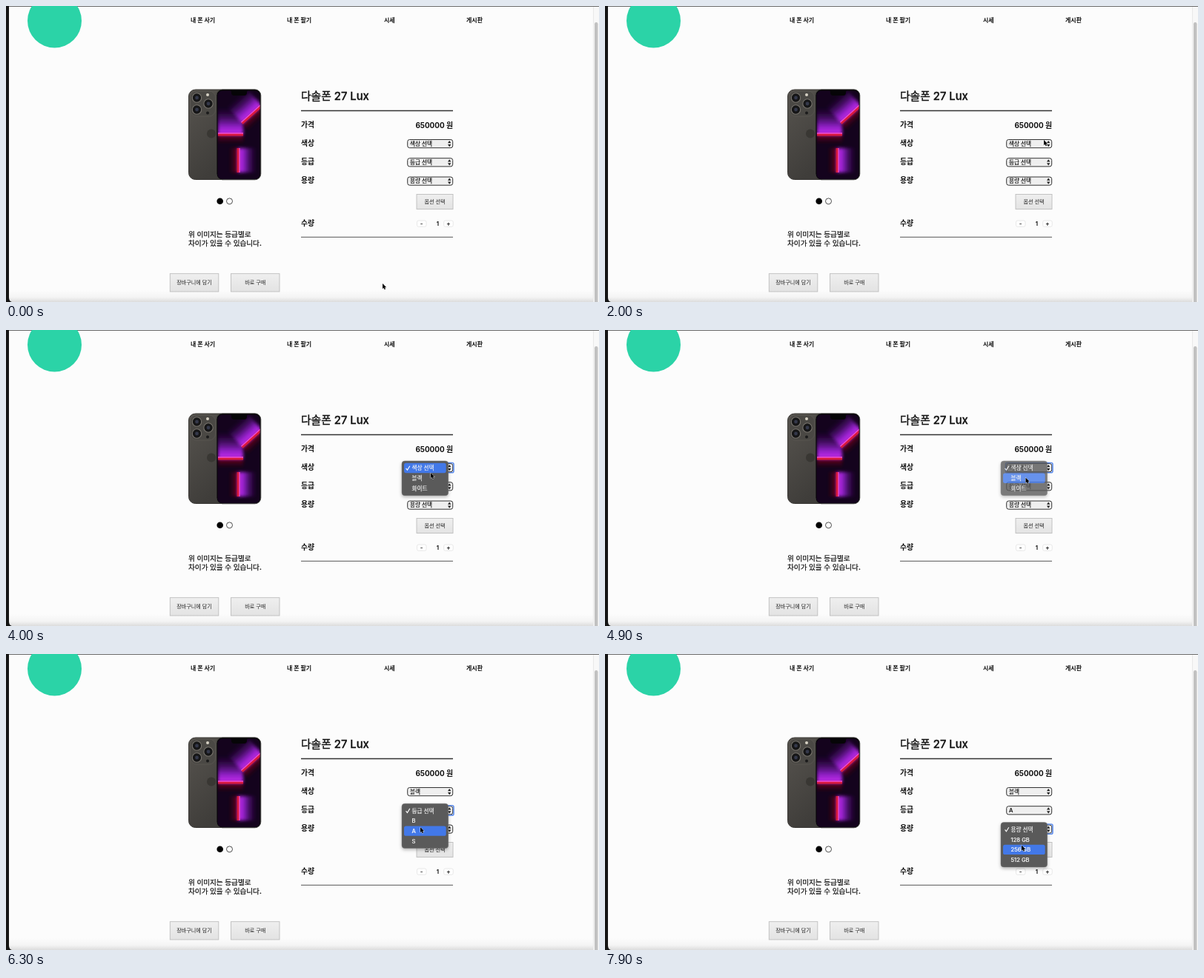
An HTML page that plays this animation: 800x400 px, repeating every 8 s.

```html
<!DOCTYPE html>
<html lang="ko">
<head>
<meta charset="utf-8">
<style>
  html, body { margin: 0; width: 100%; height: 100%; overflow: hidden; background: #fcfcfc; }
  svg { display: block; width: 800px; height: 400px; font-family: Inter, "Noto Sans CJK KR", "Noto Sans CJK", sans-serif; }
</style>
</head>
<body>
<svg id="stage" viewBox="0 0 800 400">
  <defs>
    <linearGradient id="floor" x2="0" y2="1"><stop stop-color="#fcfcfc"/><stop offset=".6" stop-color="#f4f4f4"/><stop offset="1" stop-color="#dcdcdc"/></linearGradient>
    <linearGradient id="button" x2="0" y2="1"><stop stop-color="#efefef"/><stop offset="1" stop-color="#e3e3e3"/></linearGradient>
    <linearGradient id="metal" x2=".4" y2="1"><stop stop-color="#57544f"/><stop offset="1" stop-color="#3f3d3a"/></linearGradient>
    <linearGradient id="violet" x2="0" y1="1" y2="0"><stop stop-color="#c42df0"/><stop offset=".3" stop-color="#8a1fc0"/><stop offset="1" stop-color="#3a0a5c" stop-opacity="0"/></linearGradient>
    <linearGradient id="ember" x2="0" y2="1"><stop stop-color="#8a0c24"/><stop offset="1" stop-color="#30040f" stop-opacity="0"/></linearGradient>
    <filter id="soft" x="-30%" y="-30%" width="160%" height="160%"><feGaussianBlur stdDeviation="2"/></filter>
    <filter id="shade" x="-20%" y="-20%" width="140%" height="150%"><feDropShadow dx="0" dy="2" stdDeviation="2" flood-opacity=".28"/></filter>
    <clipPath id="screen"><rect x="285.5" y="114.5" width="57" height="119.5" rx="6.5"/></clipPath>
  </defs>

  <!-- Browser window -->
  <rect width="800" height="400" fill="#fcfcfc"/>
  <rect y="384" width="800" height="16" fill="url(#floor)"/>
  <rect x="792" width="8" height="400" fill="#f8f8f8"/>
  <path d="M792.5 0V400" stroke="#e9e9e9"/>
  <rect x="794" y="22" width="4.5" height="380" rx="2.2" fill="#c1c1c1"/>
  <rect width="800" height="1" fill="#6a6a6a"/>
  <path d="M0 0H4V394Q4 399 8 400H0Z" fill="#151515"/>
  <circle cx="65.5" cy="20" r="36.5" fill="#2bd3a7"/>

  <!-- Phone -->
  <rect x="246.5" y="113" width="52" height="121.5" rx="9" fill="url(#metal)" stroke="#3a3835"/>
  <rect x="248.5" y="115" width="34" height="34" rx="8.5" fill="#4a4844" stroke="#5f5c57" stroke-width=".6"/>
  <g fill="#161617" stroke="#77736c" stroke-width="1.1">
    <circle cx="257.5" cy="124" r="6.2"/><circle cx="257.5" cy="140" r="6.2"/><circle cx="273" cy="132" r="6.2"/>
  </g>
  <g fill="#34384a"><circle cx="257.5" cy="124" r="2.4"/><circle cx="257.5" cy="140" r="2.4"/><circle cx="273" cy="132" r="2.4"/></g>
  <circle cx="272" cy="120" r="2" fill="#d6d1c4"/><circle cx="272" cy="144.5" r="2" fill="#1b1b1b"/>
  <circle cx="277" cy="172.5" r="6" fill="#393733"/>
  <rect x="284" y="112.8" width="59.8" height="122" rx="8" fill="#060507" stroke="#454341" stroke-width=".8"/>
  <rect x="285.5" y="114.5" width="57" height="119.5" rx="6.5" fill="#14031d"/>
  <g id="beams" clip-path="url(#screen)"></g>
  <path d="M303 114H326Q325 115 325 117Q325 121 321 121H308Q304 121 304 117Q304 115 303 114Z" fill="#060507"/>
  <circle cx="288.7" cy="263.8" r="4.3"/>
  <circle cx="301.5" cy="263.8" r="4" fill="#fff" stroke="#222" stroke-width=".8"/>

  <path d="M398 141.5H603" stroke="#333" stroke-width="1.4"/>
  <path d="M398 312.3H603" stroke="#555"/>
  <g id="page"></g>
  <g id="live"></g>
  <path id="cursor" d="M0 0V7.2L1.6 5.8 2.6 8.2 4 7.6 3 5.3H5.2Z" fill="#000" stroke="#fff" stroke-width=".8" paint-order="stroke"/>
</svg>
<script>
const page = document.getElementById("page");
const live = document.getElementById("live");
const cursor = document.getElementById("cursor");

// Medium weight gets a hairline outline, since the Korean face may lack it.
const text = (x, y, size, content, weight = 400, anchor = "start", fill = "#111") =>
  `<text x="${x}" y="${y}" font-size="${size}" font-weight="${weight}" text-anchor="${anchor}" fill="${fill}"` +
  (weight === 500 ? ` stroke="${fill}" stroke-width="${size * 0.022}"` : "") + `>${content}</text>`;
const button = (x, y, w, h, label) =>
  `<rect x="${x}" y="${y}" width="${w}" height="${h}" fill="url(#button)" stroke="#bdbdbd" stroke-width=".9"/>` +
  text(x + w / 2, y + h / 2 + 2.6, 7.1, label, 400, "middle", "#222");
const stepper = (x, sign) =>
  `<rect x="${x}" y="290" width="12.5" height="8.2" rx="2" fill="#fff" stroke="#dedede" stroke-width=".7"/>` +
  text(x + 6.2, 296.8, 8, sign, 500, "middle");

// A light bar: violet haze on one side, red on the other.
const beam = (x, y, angle, length, reach) =>
  `<g transform="translate(${x} ${y}) rotate(${angle})">
    <g filter="url(#soft)">
      <rect y="${-reach}" width="${length}" height="${reach}" fill="url(#violet)"/>
      <rect width="${length}" height="14" fill="url(#ember)"/>
    </g>
    <path d="M0 .8H${length}" stroke="#d81a3c" stroke-width="3.2"/>
    <path d="M0 -1H${length}" stroke="#f24fd0" stroke-width="1.3"/>
  </g>`;

document.getElementById("beams").innerHTML =
  beam(286, 173, 0, 34, 36) + beam(318, 158, -42, 36, 30) + beam(314, 192, 90, 33, 24);

page.innerHTML = [
  text(249, 22.3, 8, "내 폰 사기", 700), text(379, 22.3, 8, "내 폰 팔기", 700),
  text(510, 22.3, 8, "시세", 700), text(621, 22.3, 8, "게시판", 700),
  text(398, 127, 14.8, "다솔폰 27 Lux", 500),
  text(398, 164.3, 9.8, "가격", 700), text(603, 164.5, 9.9, "650000 원", 700, "end"),
  text(398, 188.6, 9.8, "색상", 700), text(398, 214, 9.8, "등급", 700),
  text(398, 239.3, 9.8, "용량", 700), text(398, 296.8, 9.8, "수량", 700),
  text(246, 312, 9.6, "위 이미지는 등급별로", 500),
  text(246, 324.3, 9.6, "차이가 있을 수 있습니다.", 500),
  button(554, 254.5, 49, 20, "옵션 선택"),
  button(221.3, 361.7, 65.5, 24.3, "장바구니에 담기"), button(303.5, 361.7, 65.5, 24.3, "바로 구매"),
  stepper(554.5, "-"), text(582.3, 296.8, 8, "1", 500, "middle"), stepper(590.7, "+")
].join("");

const menus = [
  { y: 180.5, options: ["색상 선택", "블랙", "화이트"], pick: 1, open: 3400, close: 4900 },
  { y: 205.7, options: ["등급 선택", "B", "A", "S"], pick: 2, open: 5500, close: 6600 },
  { y: 231, options: ["용량 선택", "128 GB", "256 GB", "512 GB"], pick: 2, open: 7200, close: 9000 }
];
const ROW = 13.7;

// Pointer path: time, x, y
const path = [
  [0, 508, 375], [400, 563, 296], [500, 563, 296], [1400, 591, 220], [2000, 592, 181],
  [2300, 586, 183], [3400, 585, 184], [4000, 573, 193], [4600, 567.5, 199.5], [4900, 567.5, 199.5],
  [5300, 587, 209], [5500, 587, 209], [6300, 559, 234], [6600, 559, 235], [7000, 582, 235],
  [7200, 578, 235], [7400, 566, 237.5], [7900, 562, 258.5]
];

function pointerAt(t) {
  const i = Math.max(1, path.findIndex(p => p[0] >= t));
  const [a, b] = [path[i - 1], path[i]];
  const u = (t - a[0]) / (b[0] - a[0]);
  const k = u * u * (3 - 2 * u);
  return [a[1] + (b[1] - a[1]) * k, a[2] + (b[2] - a[2]) * k];
}

function selectBox({ y, options, pick, open, close }, t) {
  const focused = t >= open && t <= close;
  const ring = focused ? `<rect x="540.5" y="${y - 1}" width="63.5" height="13.2" rx="2" fill="none" stroke="#5d8ceb" stroke-width="1.6"/>` : "";
  return `<rect x="541.7" y="${y}" width="61" height="11.2" rx="2.8" fill="#efefef" stroke="#333"/>` + ring +
    text(545, y + 8.2, 7.6, options[t > close ? pick : 0], 500) +
    `<path d="M596 ${y + 4.8}l2.2-3.2 2.2 3.2zM596 ${y + 6.6}l2.2 3.2 2.2-3.2z" fill="#222"/>`;
}

function popup({ y, options, pick, open, close }, t, pointerY) {
  if (t < open || t > close + 100) return "";
  const top = y - 0.8;
  const opacity = t < close ? 1 : t === close ? 0.8 : 0.3;
  const hovered = Math.max(0, Math.floor((pointerY - top) / ROW));
  const active = t < close ? hovered : pick;
  const labels = options.map((label, i) => text(547.5, top + i * ROW + 9.6, 7.6, label, 500, "start", "#f6f6f6"));
  return `<g opacity="${opacity}">
    <rect x="534" y="${top - 2.7}" width="62.7" height="${options.length * ROW + 5.6}" rx="4" fill="#5a5a5a" stroke="#707070" stroke-width=".5" filter="url(#shade)"/>
    <rect x="537" y="${top + 0.1 + active * ROW}" width="56.7" height="${ROW - 0.3}" rx="2.6" fill="#4278e8"/>
    <path d="M539.6 ${top + 7.2}l1.8 2.4 3.4-5.6" fill="none" stroke="#fff" stroke-width="1.1"/>
    ${labels.join("")}</g>`;
}

function draw(now) {
  const t = Math.floor(now % 8000 / 100) * 100;
  const [x, y] = pointerAt(t);
  live.innerHTML = menus.map(m => selectBox(m, t)).join("") + menus.map(m => popup(m, t, y)).join("");
  cursor.setAttribute("transform", `translate(${x} ${y})`);
  requestAnimationFrame(draw);
}
requestAnimationFrame(draw);
</script>
</body>
</html>
```
